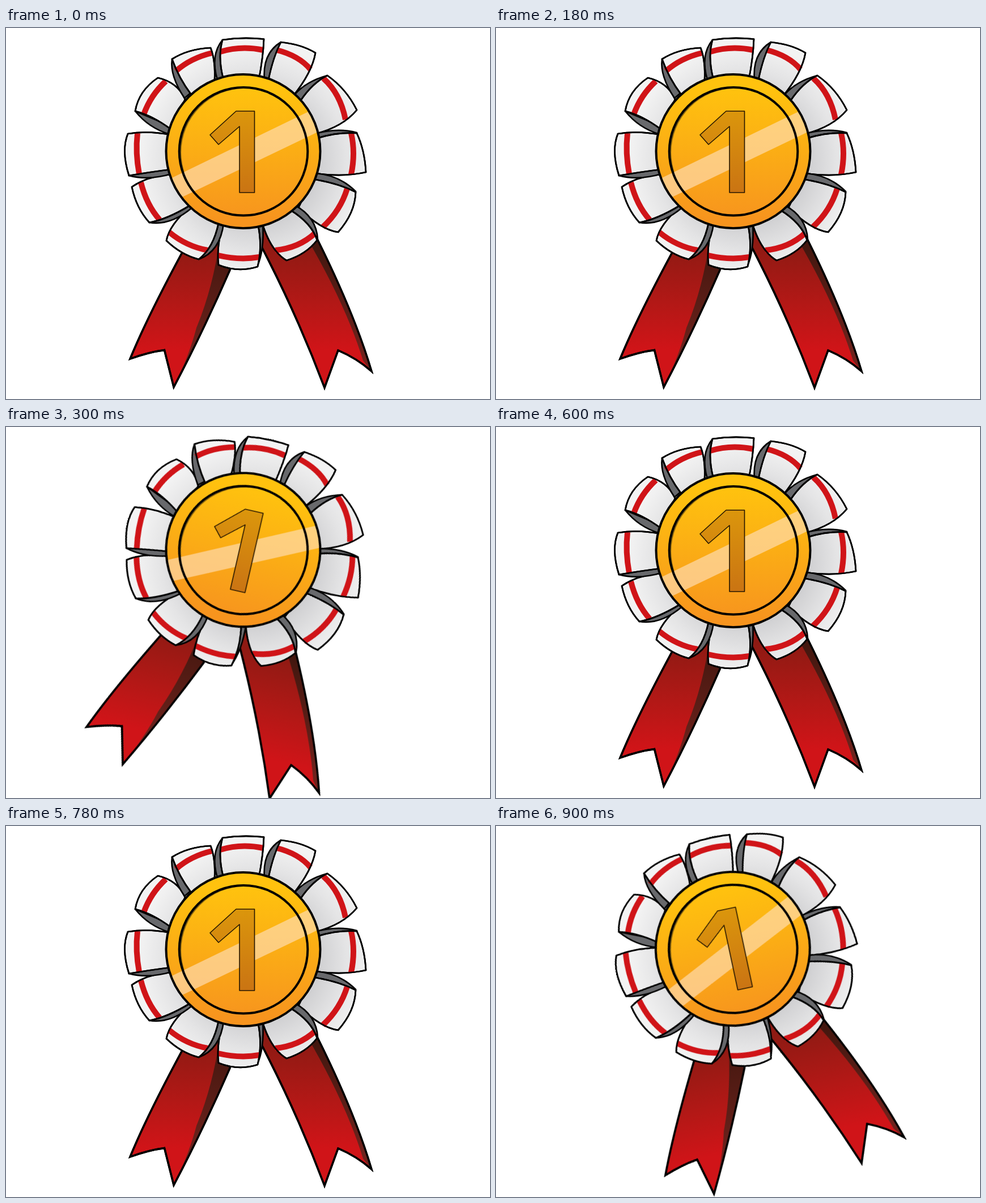
Animation of 854 by 656 pixels, one loop 1.2 s. Source, as an HTML page:

```html
<!DOCTYPE html>
<html lang="en">
<head>
<meta charset="utf-8">
<title>First place rosette</title>
<style>
  html, body { margin: 0; width: 100%; height: 100%; overflow: hidden; background: #fff; }
  svg { display: block; width: 854px; height: 656px; }
  path { stroke-linejoin: round; }

  .rosette { transform-origin: 418.5px 218px; animation: sway 1200ms step-end infinite; }
  @keyframes sway {
    0%, 50%, 100% { transform: none; }
    25% { transform: translate(0, -.7px) rotate(12.9deg); }
    75% { transform: translate(-.7px, -.9px) rotate(-12deg); }
  }

  .tails { fill: url(#red); stroke: #000; stroke-width: 3.4; }
  .tails path { stroke-linejoin: miter; }
  .tails .fold { fill: url(#maroon); stroke: none; }
  .petals { fill: url(#cloth); stroke: #000; stroke-width: 2.7; }
  .petals .back { fill: #68696c; }
  .petals .stripe { fill: none; stroke: #d01418; stroke-width: 10; }
  /* Outlines repeated above folds and stripes */
  use { fill: none; }
  .rim { fill: none; stroke: #000; stroke-width: 4; }
</style>
</head>
<body>
<svg viewBox="0 0 854 656">
  <defs>
    <linearGradient id="red" gradientUnits="userSpaceOnUse" x1="0" y1="385" x2="0" y2="590">
      <stop offset="0" stop-color="#8f1a13"/>
      <stop offset=".5" stop-color="#b31816"/>
      <stop offset=".9" stop-color="#d01418"/>
    </linearGradient>
    <linearGradient id="maroon" gradientUnits="userSpaceOnUse" x1="0" y1="385" x2="0" y2="580">
      <stop offset="0" stop-color="#43170f"/>
      <stop offset="1" stop-color="#6f231d"/>
    </linearGradient>
    <linearGradient id="gold" gradientUnits="userSpaceOnUse" x1="0" y1="82" x2="0" y2="354">
      <stop offset=".1" stop-color="#ffc20e"/>
      <stop offset=".5" stop-color="#fbad15"/>
      <stop offset=".95" stop-color="#f7941e"/>
    </linearGradient>
    <linearGradient id="bronze" gradientUnits="userSpaceOnUse" x1="0" y1="147" x2="0" y2="291">
      <stop offset="0" stop-color="#db960c"/>
      <stop offset="1" stop-color="#ca7413"/>
    </linearGradient>
    <radialGradient id="cloth" gradientUnits="userSpaceOnUse" cx="440" cy="235" r="230">
      <stop offset=".48" stop-color="#cfcfd1"/>
      <stop offset=".7" stop-color="#e4e4e5"/>
      <stop offset=".9" stop-color="#f3f3f3"/>
    </radialGradient>
    <clipPath id="coin"><circle cx="418.5" cy="218" r="136"/></clipPath>
    <clipPath id="dish"><circle cx="419" cy="218.300" r="113.300"/></clipPath>
  </defs>

  <g class="rosette">
    <g class="tails">
      <path id="left" d="M320 380Q250 509 219 585Q252 573 279.500 569.500L296 635Q347 538 395 428L395 370Z"/>
      <path class="fold" d="M377 375Q365 460 336 530Q323 580 296 635Q347 538 395 428L395 375Z"/>
      <use href="#left"/>
      <path id="right" d="M450 345L450 385Q514 508 562 636L586 570Q619 584 645 607Q615 506 550 375L520 345Z"/>
      <path class="fold" d="M530 370Q600 490 630 588L645 607Q615 506 550 375Z"/>
      <use href="#right"/>
    </g>

    <!-- Loops, clockwise from the top -->
    <g class="petals">
      <path class="back" d="M382 21Q360 48 373 92L395 92Z"/>
      <path id="p1" d="M382 21Q417 15.500 455 19.500Q454 50 446 92L384 92Q373 52 382 21Z"/>
      <path class="stripe" d="M378 42Q415 30.500 454 39"/>
      <use href="#p1"/>

      <path class="back" d="M485 25Q452 45 456 92L475 92Z"/>
      <path id="p2" d="M485 25Q522 29 546 44Q540 79 506 121L463 92Q471 52 485 25Z"/>
      <path class="stripe" d="M478 39Q517 49 537 73"/>
      <use href="#p2"/>

      <path class="back" d="M567 84Q530 94 509 118L525 132Z"/>
      <path id="p3" d="M567 84Q600 107 619 145Q594 175 546 187L520 128Q541 97 567 84Z"/>
      <path class="stripe" d="M560 89Q590 116 599 162"/>
      <use href="#p3"/>

      <path class="back" d="M619 185Q584 176 546 187L550 203Z"/>
      <path id="p4" d="M619 186Q633 216 635 255Q595 264 546 257L549 195Q584 184 619 186Z"/>
      <path class="stripe" d="M609 186Q617 221 609 259"/>
      <use href="#p4"/>

      <path class="back" d="M617 289Q588 260 546 257L540 275Z"/>
      <path id="p5" d="M617 290Q616 327 586 361Q556 357 516 318L540 267Q585 274 617 290Z"/>
      <path class="stripe" d="M602 284Q590 323 559 352"/>
      <use href="#p5"/>

      <path class="back" d="M550 374Q548 334 509 313L501 328Z"/>
      <path id="p6" d="M549 375Q530 400 495 411Q467 394 452 345L502 322Q539 345 549 375Z"/>
      <path class="stripe" d="M545 363Q517 389 475 393"/>
      <use href="#p6"/>

      <path class="back" d="M443 422Q456 394 453 345L437 345Z"/>
      <path id="p7" d="M375 419Q410 433 444 422Q453 385 444 345L384 345Q371 382 375 419Z"/>
      <path class="stripe" d="M374 402Q412 411 447 405"/>
      <use href="#p7"/>

      <path class="back" d="M340 409Q378 395 384 345L365 345Z"/>
      <path id="p8" d="M283 376Q309 401 340 409Q366 389 375 345L326 315Q288 348 283 376Z"/>
      <path class="stripe" d="M288 361Q318 386 356 393"/>
      <use href="#p8"/>

      <path class="back" d="M253 344Q290 350 328 318L315 306Z"/>
      <path id="p9" d="M222 281Q230 319 253 344Q285 338 324 314L291 259Q249 262 222 281Z"/>
      <path class="stripe" d="M238 273Q248 313 271 339"/>
      <use href="#p9"/>

      <path class="back" d="M217 261Q250 270 292 258L290 244Z"/>
      <path id="p10" d="M215 187Q203 217 217 261Q252 255 291 250L291 189Q250 181 215 187Z"/>
      <path class="stripe" d="M232 186Q228 221 235 258"/>
      <use href="#p10"/>

      <path class="back" d="M228 147Q252 177 289 188L294 175Z"/>
      <path id="p11" d="M268 88Q234 111 228 147Q257 154 291 179L316 126Q303 96 268 88Z"/>
      <path class="stripe" d="M282 94Q255 119 243 153"/>
      <use href="#p11"/>

      <path class="back" d="M293 55Q289 85 315 124L329 112Z"/>
      <path id="p12" d="M293 55Q321 37 361 35Q370 58 368 94L327 118Q305 89 293 55Z"/>
      <path class="stripe" d="M300 76Q326 53 364 44"/>
      <use href="#p12"/>
    </g>

    <!-- Medal -->
    <circle cx="418.5" cy="218" r="136" fill="url(#gold)"/>
    <g clip-path="url(#dish)">
      <circle cx="419" cy="218.300" r="113.300" fill="#89640f"/>
      <circle cx="422.500" cy="220" r="113.300" fill="url(#gold)"/>
    </g>
    <path clip-path="url(#coin)" fill="#ffdfb8" fill-opacity=".65" d="M270 276L560 135L575 172L294 307Z"/>
    <path fill="url(#bronze)" stroke="#241500" stroke-width="1.6" d="M406 147L438.500 147L438.500 291L412 291L412 174L375 206L360 189Z"/>
    <circle class="rim" cx="419" cy="218.300" r="113.300"/>
    <circle class="rim" cx="418.5" cy="218" r="136"/>
  </g>
</svg>
</body>
</html>
```
